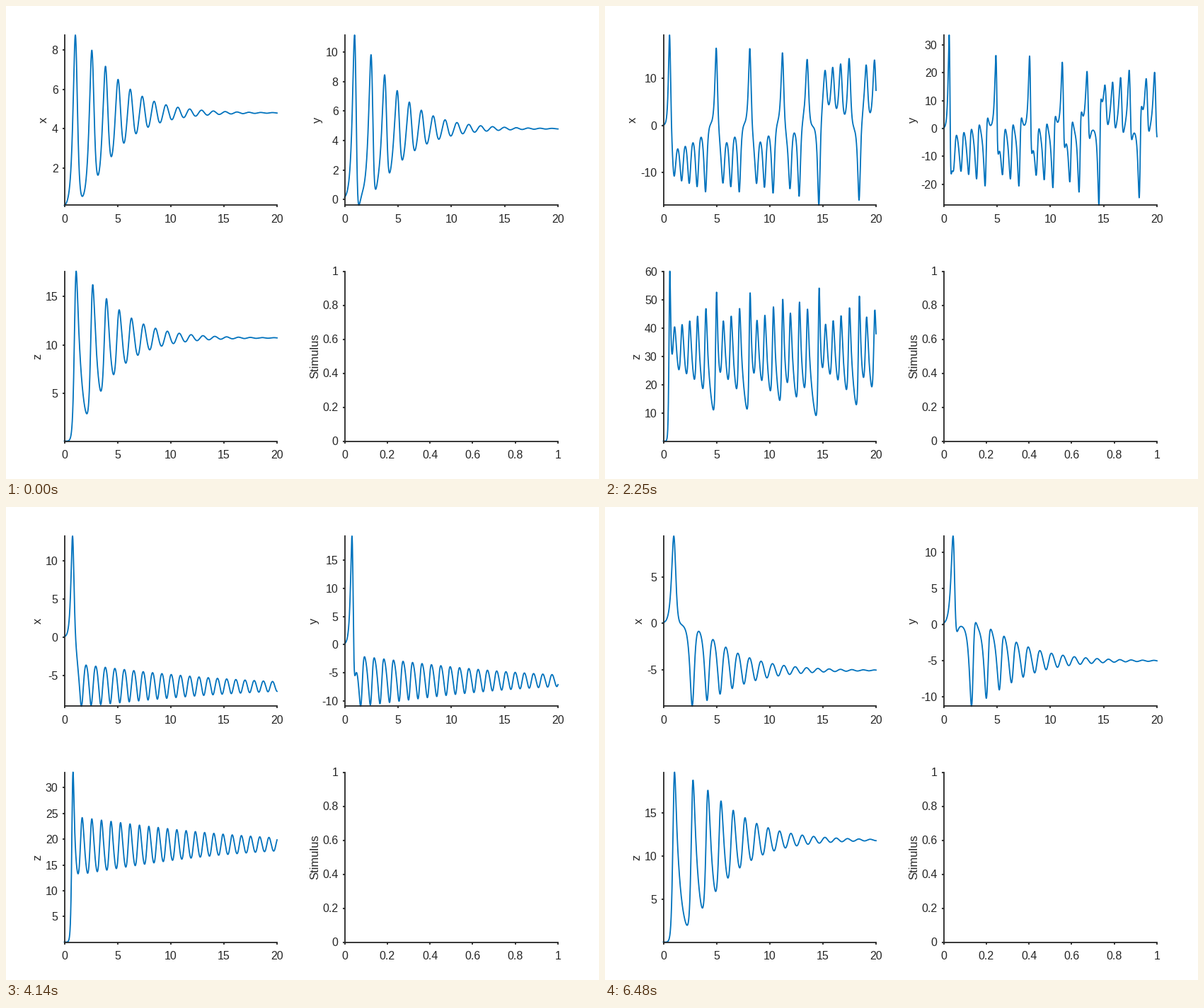
Animation, 838 px wide and 668 px high, one loop 6510 ms. Source, as a matplotlib script:

```python
import numpy as np
import matplotlib.pyplot as plt
from matplotlib.animation import FuncAnimation

W, H, DPI = 838, 668, 100
FRAMES, STEP_MS = 217, 30
SIGMA, BETA = 5.6, 2.155
START = (0.1, 0.15, 0.05)
T_END, DT, KEEP = 20.0, 0.005, 2
INK, BLUE = "#262626", "#0072bd"
PX = 72 / DPI  # points per pixel

plt.rcParams["font.family"] = "Liberation Sans"
plt.rcParams["axes.unicode_minus"] = False

# Time in ms and the value of rho reached there
RHO_KEYS = [(0, 11.72), (660, 11.74), (900, 12.7), (1200, 15.02), (1770, 20.58),
            (2300, 36.0), (2790, 53.2), (2880, 54.2), (2940, 54.2), (3510, 36.1),
            (4080, 21.0), (4620, 14.5), (4980, 13.4), (5310, 13.05),
            (5970, 12.89), (6480, 12.84)]


def monotone_curve(keys, t):
    """Cubic Hermite through the keys without overshoot."""
    kx, ky = np.array(keys, float).T
    h = np.diff(kx)
    d = np.diff(ky) / h
    m = np.zeros(len(kx))
    same = d[:-1] * d[1:] > 0
    m[1:-1][same] = 2 * (d[:-1] * d[1:])[same] / (d[:-1] + d[1:])[same]
    m[0], m[-1] = d[0], d[-1]
    i = np.clip(np.searchsorted(kx, t, side="right") - 1, 0, len(h) - 1)
    s = (t - kx[i]) / h[i]
    return (ky[i] * (1 + 2 * s) * (1 - s) ** 2 + ky[i + 1] * s * s * (3 - 2 * s)
            + h[i] * s * (1 - s) * (m[i] * (1 - s) - m[i + 1] * s))


def lorenz(s, rho):
    x, y, z = s
    return np.array([SIGMA * (y - x), x * (rho - z) - y, x * y - BETA * z])


def integrate(rho):
    """Runge-Kutta runs for all rho at once: result[time, variable, run]."""
    s = np.repeat(np.array(START)[:, None], len(rho), axis=1)
    out = [s]
    for n in range(1, round(T_END / DT) + 1):
        k1 = lorenz(s, rho)
        k2 = lorenz(s + DT / 2 * k1, rho)
        k3 = lorenz(s + DT / 2 * k2, rho)
        k4 = lorenz(s + DT * k3, rho)
        s = s + DT / 6 * (k1 + 2 * k2 + 2 * k3 + k4)
        if n % KEEP == 0:
            out.append(s)
    return np.array(out)


def nice_ticks(lo, hi):
    step = next(s for s in (1, 2, 5, 10, 20, 50) if (hi - lo) / s <= 7)
    return np.arange(np.ceil(lo / step), np.floor(hi / step) + 1) * step


def text_width(label, size=16):
    em = {"-": 0.333, ".": 0.278}
    return size * sum(em.get(c, 0.556) for c in label)


class Panel:
    def __init__(self, left, top, width, height, name):
        self.left = left
        self.ax = fig.add_axes([left / W, 1 - (top + height) / H, width / W, height / H])
        self.ax.patch.set_visible(False)
        self.ax.spines[["top", "right"]].set_visible(False)
        for side in ("left", "bottom"):
            self.ax.spines[side].set(linewidth=1.8 * PX, color=INK)
        self.ax.tick_params(length=3.2 * PX, width=1.8 * PX, color=INK,
                            labelcolor=INK, labelsize=16 * PX)
        self.ax.tick_params(axis="x", pad=9.2 * PX)
        self.ax.tick_params(axis="y", pad=5.6 * PX)
        self.name = fig.text(0, 1 - (top + height / 2) / H, name, rotation=90,
                             rotation_mode="anchor", ha="center", va="baseline",
                             fontsize=16.5 * PX, color=INK)

    def set_x(self, hi, ticks):
        self.ax.set_xlim(0, hi)
        self.ax.set_xticks(ticks, [f"{v:g}" for v in ticks])

    def set_y(self, lo, hi, ticks):
        labels = [f"{v:g}" for v in ticks + 0.0]
        self.ax.set_ylim(lo, hi)
        self.ax.set_yticks(ticks, labels)
        widest = max(map(text_width, labels))
        self.name.set_x((self.left - 9 - widest - 6.3) / W)


fig = plt.figure(figsize=(W / DPI, H / DPI), dpi=DPI, facecolor="white")

rho = monotone_curve(RHO_KEYS, np.arange(FRAMES) * STEP_MS)
runs = integrate(rho)
time = np.linspace(0, T_END, len(runs))

panels = [Panel(82.5, 41, 300.5, 240.5, "x"),
          Panel(478.5, 41, 301.5, 240.5, "y"),
          Panel(82.5, 374.5, 300.5, 240, "z")]
curves = []
for p in panels:
    p.set_x(T_END, np.arange(0, 21, 5))
    curves += p.ax.plot(time, 0 * time, color=BLUE, lw=1.8 * PX, clip_on=False)

stimulus = Panel(478.5, 374.5, 301.5, 240, "Stimulus")
fifths = np.linspace(0, 1, 6)
stimulus.set_x(1, fifths)
stimulus.set_y(0, 1, fifths)


def update(i):
    for k, (panel, curve) in enumerate(zip(panels, curves)):
        v = runs[:, k, i]
        lo, hi = v.min(), v.max()
        curve.set_ydata(v)
        panel.set_y(lo, hi, nice_ticks(lo, hi))
    return curves


anim = FuncAnimation(fig, update, frames=FRAMES, interval=STEP_MS,
                     repeat=True, repeat_delay=0, blit=False)
plt.show()
```
